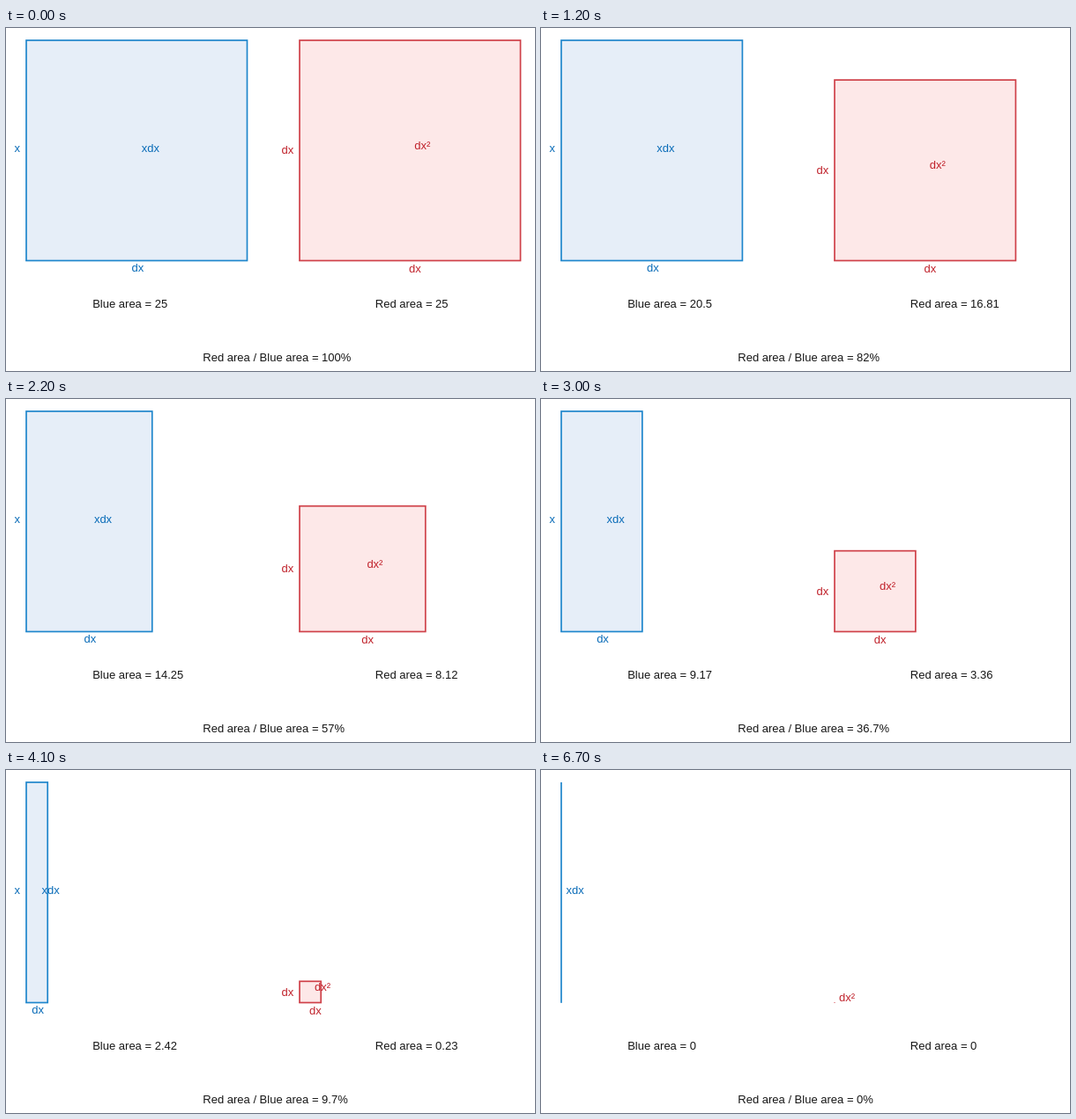
Animation, 600 px wide and 390 px high, one loop 6750 ms. Source, as an HTML page with a canvas:

```html
<!DOCTYPE html>
<html lang="en">
<head>
<meta charset="utf-8">
<title>Comparing x·dx with dx²</title>
<style>
  html, body { margin: 0; width: 100%; height: 100%; overflow: hidden; background: #fff; }
  canvas { display: block; }
</style>
</head>
<body>
<canvas id="stage" width="600" height="390"></canvas>
<script>
const ctx = document.getElementById('stage').getContext('2d');
const LOOP = 6750, TICK = 50;
const UNIT = 50.1;               // pixels per unit of length
const SIDE = 5;                  // x, and the first value of dx
const BASE = 264.5;              // lower edge of both shapes
const BLUE_X = 23, RED_X = 333;

const BLUE = { line: '#1f86cc', fill: '#e6eef8', text: '#0a6cb8' };
const RED = { line: '#cf4149', fill: '#fde8e8', text: '#c0232c' };
const INK = '#161616';

// [time in ms, slider steps of 1/60 unit]
const PACE = [[490, 0], [800, 23], [1600, 84], [2200, 129], [3000, 190], [4100, 271], [4490, 300]];

function sliderSteps(t) {
  if (t <= PACE[0][0]) return 0;
  for (let i = 1; i < PACE.length; i++) {
    const [t0, a] = PACE[i - 1], [t1, b] = PACE[i];
    if (t <= t1) return Math.round(a + (b - a) * (t - t0) / (t1 - t0));
  }
  return SIDE * 60;
}

function trim(value, digits) {
  return String(Number(value.toFixed(digits)));
}

function write(text, x, y, color) {
  ctx.fillStyle = color;
  ctx.fillText(text, x, y);
}

function box(x, w, h, colors) {
  ctx.fillStyle = colors.fill;
  ctx.fillRect(x, BASE - h, w, h);
  ctx.strokeStyle = ctx.fillStyle = colors.line;
  ctx.lineWidth = 1.7;
  ctx.strokeRect(x, BASE - h, w, h);
  // corner dot stays visible when the box has no size
  ctx.fillRect(x - 0.5, BASE - 0.5, 1, 1);
}

function draw(t) {
  const dx = SIDE - sliderSteps(t) / 60;
  const w = dx * UNIT, mid = w / 2;
  const blueArea = SIDE * dx, redArea = dx * dx;

  ctx.fillStyle = '#fff';
  ctx.fillRect(0, 0, 600, 390);
  ctx.font = '13px "Liberation Sans", Arial, sans-serif';
  ctx.textBaseline = 'alphabetic';

  box(BLUE_X, w, SIDE * UNIT, BLUE);
  box(RED_X, w, w, RED);

  write('xdx', BLUE_X + mid + 5.5, 141, BLUE.text);
  write('dx²', RED_X + mid + 5, BASE - mid - 1.6, RED.text);
  if (dx > 0) {
    write('x', 9.5, 141, BLUE.text);
    write('dx', BLUE_X + mid - 5.8, 277, BLUE.text);
    write('dx', 312.6, BASE - mid + 4.2, RED.text);
    write('dx', RED_X + mid - 1.2, 277.5, RED.text);
  }

  write('Blue area = ' + trim(blueArea, 2), 98.2, 318, INK);
  write('Red area = ' + trim(redArea, 2), 418.8, 318, INK);
  write('Red area / Blue area = ' + trim(dx / SIDE * 100, 1) + '%', 223.3, 379, INK);
}

const start = performance.now();
function frame() {
  const t = (performance.now() - start) % LOOP;
  draw(Math.floor(t / TICK) * TICK);
  requestAnimationFrame(frame);
}
frame();
</script>
</body>
</html>
```
